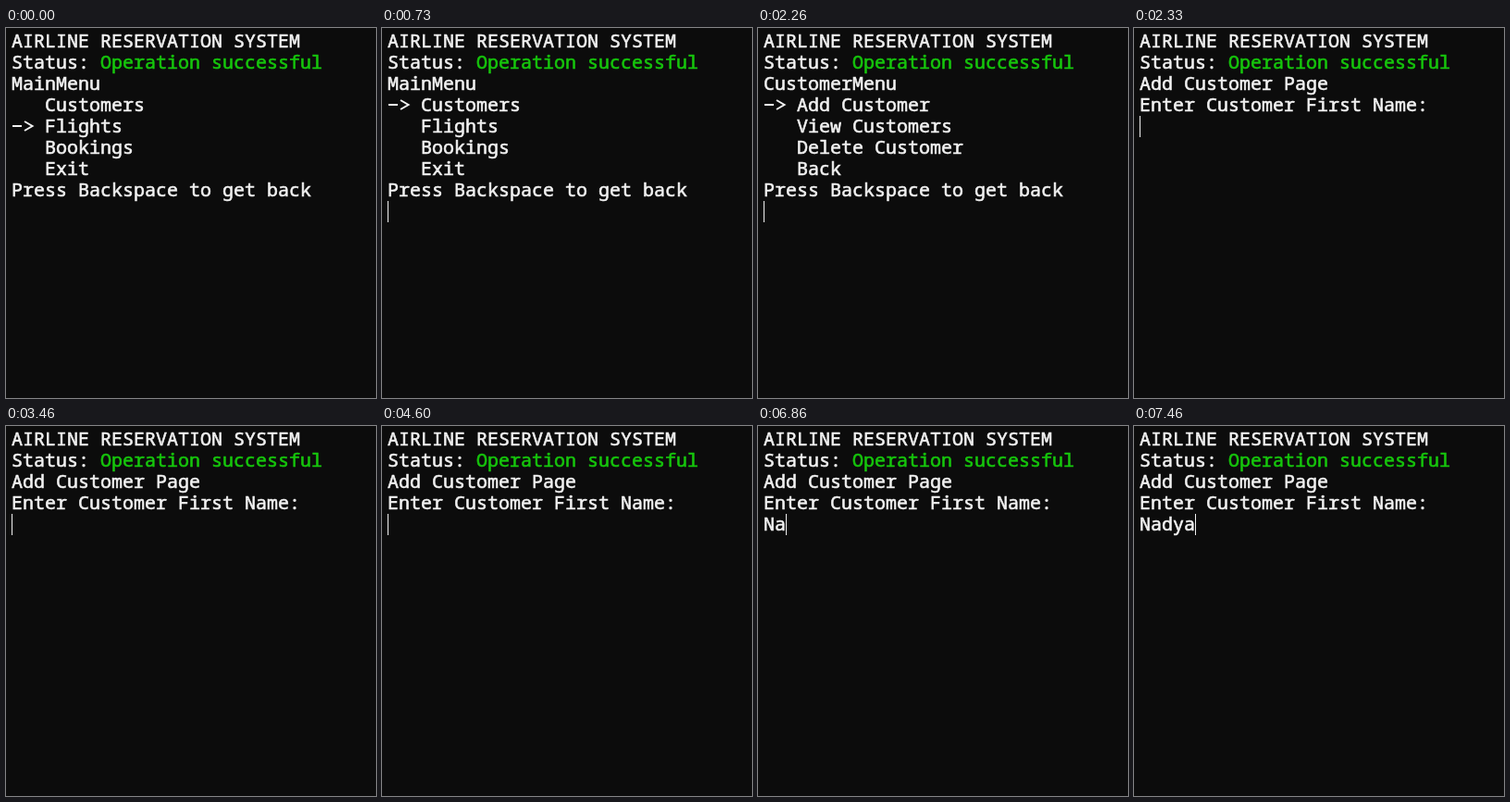
Write an HTML page that moves like this. It is 400 px wide and 400 px high and loops after 8000 ms.

```html
<!DOCTYPE html>
<html lang="en">
<head>
<meta charset="utf-8">
<title>Airline reservation terminal</title>
<style>
  html, body { margin: 0; width: 100%; height: 100%; overflow: hidden; background: #0c0c0c; }
  svg { display: block; width: 100%; height: 100%; color: #f2f2f2; }
  text {
    font: 500 20px "Noto Sans Mono", "DejaVu Sans Mono", monospace;
    fill: currentColor; stroke: currentColor; stroke-width: 0.6; white-space: pre;
  }
  .ok { color: #16c60c; }
  #arrow { fill: none; stroke: currentColor; stroke-width: 2; }
  #cursor { fill: currentColor; }
</style>
</head>
<body>
<svg viewBox="0 0 400 400">
  <rect width="400" height="400" fill="#0c0c0c"/>
  <text x="6" y="21">AIRLINE RESERVATION SYSTEM</text>
  <text x="6" y="44">Status:</text>
  <text x="102" y="44" class="ok">Operation successful</text>
  <g id="lines"></g>
  <path id="arrow" d="M7 0H17M20 -5L28.5 0L20 5"/>
  <rect id="cursor" width="1" height="23" shape-rendering="crispEdges"/>
</svg>
<script>
const LOOP = 8000, LEFT = 6, TOP = 3, CELL = 12, ROW = 23, FIRST = 2;
const NAME = "Nadya";
const KEYS = [5400, 5660, 7060, 7260, 7460];
// The cursor starts hidden and flips at each of these times.
const BLINKS = [600, 1800, 2260, 2860, 3460, 4000, 4600, 6330, 6860];

const menu = (title, items) =>
  [title, ...items.map(item => "   " + item), "Press Backspace to get back"];
const mainMenu = menu("MainMenu", ["Customers", "Flights", "Bookings", "Exit"]);
const customerMenu = menu("CustomerMenu", ["Add Customer", "View Customers", "Delete Customer", "Back"]);
const form = ["Add Customer Page", "Enter Customer First Name:"];

const $ = id => document.getElementById(id);
const rows = Array.from({ length: 6 }, (_, i) => {
  const row = document.createElementNS("http://www.w3.org/2000/svg", "text");
  row.setAttribute("x", LEFT);
  row.setAttribute("y", 21 + (FIRST + i) * ROW);
  return $("lines").appendChild(row);
});

const passed = (times, t) => times.filter(at => t >= at).length;

function screenAt(t) {
  if (t < 730) return { lines: mainMenu, pick: 4 };
  if (t < 1200) return { lines: mainMenu, pick: 3 };
  if (t < 2330) return { lines: customerMenu, pick: 3 };
  return { lines: [...form, NAME.slice(0, passed(KEYS, t))] };
}

function draw(t) {
  const { lines, pick } = screenAt(t);
  rows.forEach((row, i) => {
    const text = lines[i] || "";
    if (row.textContent !== text) row.textContent = text;
  });

  $("arrow").setAttribute("visibility", pick ? "visible" : "hidden");
  if (pick) $("arrow").setAttribute("transform", `translate(0 ${14 + pick * ROW})`);

  const column = pick ? 0 : lines[2].length;
  const line = pick ? 8 : 4;
  $("cursor").setAttribute("x", LEFT + column * CELL);
  $("cursor").setAttribute("y", TOP + line * ROW);
  $("cursor").setAttribute("visibility", passed(BLINKS, t) % 2 ? "visible" : "hidden");
}

const start = performance.now();
function tick() {
  draw((performance.now() - start) % LOOP);
  requestAnimationFrame(tick);
}
tick();
</script>
</body>
</html>
```
